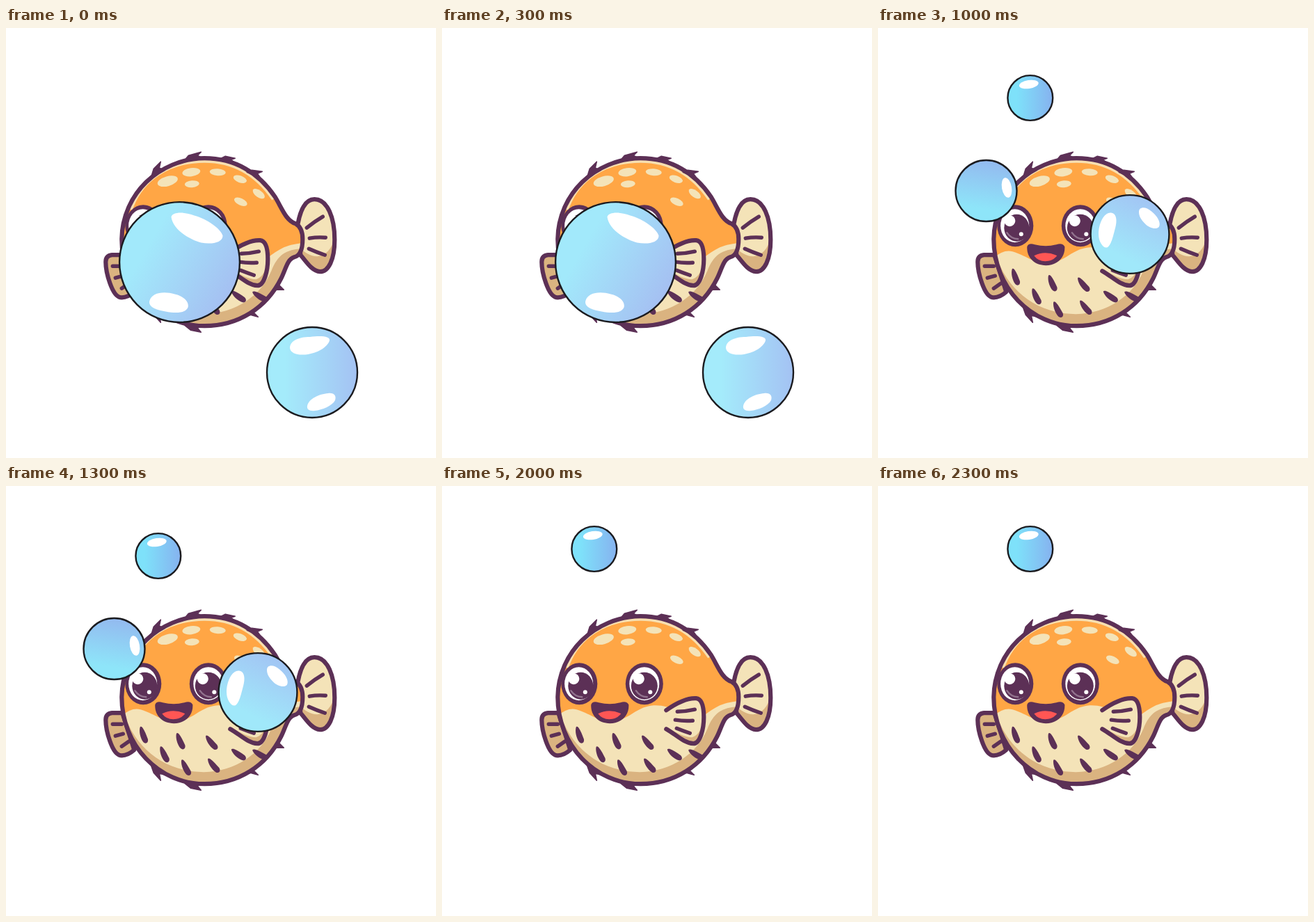
An HTML page that plays this animation: 618 px wide and 618 px high, repeating every 2.5 s.

```html
<!DOCTYPE html>
<html lang="en">
<head>
<meta charset="utf-8">
<title>Pufferfish and bubbles</title>
<style>
html, body { margin: 0; width: 100%; height: 100%; overflow: hidden; background: #fff; }
svg { display: block; width: 100vw; height: 100vh; }
.ink { fill: #5c3056; }
.line { fill: none; stroke: #5c3056; stroke-width: 6.2; stroke-linecap: round; stroke-linejoin: round; }
.ray { stroke-width: 5.4; }
.spikes { stroke: #5c3056; stroke-width: 1.6; stroke-linejoin: round; }
.cream { fill: #f4e3b8; }
.tan { fill: #dab380; }
.bubble circle { stroke: #1b1b1f; stroke-width: 2.4; }
.bubble path, .bubble ellipse { fill: #fff; }
</style>
</head>
<body>
<svg viewBox="0 0 618 618">
  <defs>
    <path id="body" d="M167 304C168 240 220 189 286 188C330 188 364 209 387 243C397 259 403 278 417 282C424 286 427 295 427 304C427 317 424 328 415 330C405 333 403 347 396 361C375 403 335 429 286 429C220 429 167 373 167 304Z"/>
    <path id="tail" d="M420 283C424 261 432 247 444 247C463 247 473 274 473 305C473 334 464 351 452 351C440 350 432 336 424 327Z"/>
    <path id="sideFin" d="M185 380Q175 389 165 388C153 386 144 352 144 337Q144 328 153 327L168 327Z"/>
    <path id="fin" d="M323 323C336 314 352 305 366 306C375 307 377 320 377 333C377 349 372 371 362 371C348 370 337 358 323 350Z"/>
    <clipPath id="inBody"><use href="#body"/></clipPath>
    <clipPath id="inTail"><use href="#tail"/></clipPath>
    <clipPath id="inFin"><use href="#fin"/></clipPath>
  </defs>

  <g id="fish" transform="translate(-0.7 -0.8)">
    <use href="#sideFin" class="tan"/>
    <use href="#sideFin" class="line"/>
    <path class="line ray" d="M154 343L167 343M158 360L169 357M167 375L177 368"/>

    <use href="#tail" class="cream"/>
    <path class="tan" clip-path="url(#inTail)" d="M475 296C470 318 461 328 448 329C438 329 430 323 423 317L436 360H480Z"/>
    <use href="#tail" class="line"/>
    <path class="line ray" d="M433 288Q444 279 456 272M437 303Q448 301 460 302M436 318Q447 323 459 327"/>

    <use href="#body" fill="#ffa645"/>
    <g clip-path="url(#inBody)">
      <path d="M180 262C195 218 235 192 286 192C329 192 362 213 385 247" fill="none" stroke="#f7dfb0" stroke-width="5"/>
      <path class="cream" d="M160 338Q178 318 194 322C212 327 225 339 243 339C271 338 278 318 305 316C330 315 343 330 378 330C391 321 402 311 430 310V440H160Z"/>
      <path class="tan" d="M166 308C174 364 219 412 285 412C330 411 367 386 382 350C391 327 403 318 430 318V445H160Z"/>
    </g>
    <use href="#body" class="line"/>
    <path class="ink spikes" d="M209 216L213 203L223 193L221 202L229 205ZM258 190L263 184L281 179L276 184L285 189ZM308 189L316 185L330 188L324 190L331 196ZM347 208L354 205L369 207L362 210L367 217ZM386 377L400 377L393 370ZM342 416L352 413L363 416L355 408ZM255 426L266 435L281 438L276 432L285 427ZM208 399L213 413L223 424L221 414L230 416Z"/>
    <g id="spots" class="cream"></g>
    <g id="quills" class="ink"></g>

    <use href="#fin" class="cream"/>
    <path class="tan" clip-path="url(#inFin)" d="M380 325C375 348 370 359 360 362C348 362 338 355 328 350L355 378H382Z"/>
    <path class="line" d="M323 323C336 314 352 305 366 306C375 307 377 320 377 333C377 349 372 371 362 371C348 370 337 358 323 350"/>
    <path class="line ray" d="M339 325Q351 325 364 322M336 337Q349 339 361 338M338 349Q348 353 357 356"/>

    <g id="eyes"></g>
    <path class="ink" d="M215 315Q217 309 226 312Q242 316 257 312Q266 309 269 315C270 330 259 342 242 342C225 342 214 330 215 315Z"/>
    <path fill="#ff5654" d="M225 328Q241 320 258 328Q252 336 241 336Q231 336 225 328Z"/>
  </g>
  <g id="bubbles"></g>
</svg>
<script>
const NS = "http://www.w3.org/2000/svg";
const STEP = 500, COUNT = 5;
const get = id => document.getElementById(id);

function add(parent, tag, attrs) {
  const el = document.createElementNS(NS, tag);
  for (const key in attrs) el.setAttribute(key, attrs[key]);
  return parent.appendChild(el);
}

function oval(parent, [cx, cy, rx, ry, tilt = 0], attrs = {}) {
  return add(parent, "ellipse", { cx, cy, rx, ry, transform: `rotate(${tilt} ${cx} ${cy})`, ...attrs });
}

[[233, 221, 15, 7, -16], [267, 208, 13, 6, -7], [305, 208, 11.5, 5, 4],
 [337, 218, 10, 5, 20], [364, 239, 10, 5, 36], [268, 225, 10.5, 5, -5],
 [338, 250.5, 10, 5, 25]].forEach(s => oval(get("spots"), s));

[[198, 359, 0], [228, 387, -6], [251, 368, -4], [259, 406, -8],
 [296, 370, -20], [299, 403, -20], [335, 387, -35], [366, 387, -40]].forEach(([x, y, tilt]) =>
  add(get("quills"), "path", {
    d: "M-4 -11C-6 -6 -4 4 0 9C3 12 7 10 6 5C4 0 2 -6 -1 -10Q-3 -12 -4 -11Z",
    transform: `translate(${x} ${y}) rotate(${tilt}) scale(1.1)`
  }));

function eye(x, rx, dx) {
  const g = get("eyes"), white = { fill: "#fff" };
  oval(g, [x, 285, rx, 30], { class: "ink" });
  oval(g, [x - dx / 3, 285, rx - 5.5, 24], white);
  oval(g, [x + dx, 288, rx - 8, 19.5], { class: "ink" });
  oval(g, [x - 8, 278, 8, 8], white);
  oval(g, [x + 8.5, 297, 3, 3], white);
  add(g, "path", {
    d: `M${x - 12} 295Q${x - 6} 304 ${x + 4} 304`,
    fill: "none", stroke: "#92738e", "stroke-width": 2.4, "stroke-linecap": "round"
  });
}
eye(198, 26, 2);
eye(291.5, 27, 0);

// at: centre for each step of the loop, null while hidden; dir: gradient direction
const bubbles = [
  { r: 86.4, at: [[249.5, 336.5], [249.5, 306.5]], dir: [0.85, 0.5], from: "#a2e9fb", to: "#a5c0f2",
    shine: ["M-12 -65C-10 -72 5 -73 21 -67C40 -62 59 -48 62 -38C62 -28 46 -25 31 -28C12 -33 -10 -48 -12 -65Z",
            "M-43 55C-40 44 -23 41 -7 46C6 49 14 57 12 65C9 73 -4 74 -20 71C-35 69 -46 64 -43 55Z"] },
  { r: 65, at: [[440, 495], [440, 465]], dir: [1, 0], from: "#a4ebfb", to: "#a4c2f3",
    shine: ["M-32 -35C-32 -45 -20 -51 -3 -51C13 -53 26 -52 25 -46C23 -38 11 -29 -6 -26C-20 -24 -31 -27 -32 -35Z",
            "M-7 48C-5 38 10 31 23 30C32 29 35 34 33 40C29 48 14 54 4 55C-4 56 -8 53 -7 48Z"] },
  { r: 56.4, at: [null, [321, 91.5], [362, 296.5]], dir: [0.45, -0.9], from: "#a0e8fa", to: "#a2c5f4",
    shine: ["M-45 0C-45 -16 -37 -32 -27 -31C-19 -30 -18 -20 -21 -9C-24 2 -27 17 -33 19C-39 20 -45 10 -45 0Z",
            "M13 -32C13 -40 23 -40 31 -33C39 -27 45 -17 42 -11C38 -6 28 -9 22 -15C16 -21 13 -26 13 -32Z"] },
  { r: 44, at: [null, [155.5, 194], [155.5, 234], [155.5, 204]], dir: [0.15, -1], from: "#8ee5f9", to: "#93b9ef",
    shine: [[29.5, -4.5, 7, 14.5, -10]] },
  { r: 32.4, at: [null, null, [218.8, 100.5], [218.8, 70.5], [218.8, 90.5]], dir: [1, 0], from: "#7ee1fa", to: "#86b2ef",
    shine: [[-2, -19.5, 14, 6, -9]] }
];

bubbles.forEach((b, i) => {
  const g = b.el = add(get("bubbles"), "g", { class: "bubble" });
  const [x, y] = b.dir.map(v => v * b.r);
  const grad = add(g, "linearGradient", { id: "shade" + i, gradientUnits: "userSpaceOnUse", x1: -x, y1: -y, x2: x, y2: y });
  add(grad, "stop", { offset: 0.2, "stop-color": b.from });
  add(grad, "stop", { offset: 1, "stop-color": b.to });
  add(g, "circle", { r: b.r, fill: `url(#shade${i})` });
  b.shine.forEach(s => Array.isArray(s) ? oval(g, s) : add(g, "path", { d: s }));
});

function draw(ms) {
  const step = Math.floor(ms / STEP) % COUNT;
  for (const { el, at } of bubbles) {
    const pos = at[step];
    el.style.display = pos ? "" : "none";
    if (pos) el.setAttribute("transform", `translate(${pos})`);
  }
}

const start = performance.now();
function tick() {
  draw(performance.now() - start);
  requestAnimationFrame(tick);
}
draw(0);
requestAnimationFrame(tick);
</script>
</body>
</html>
```
